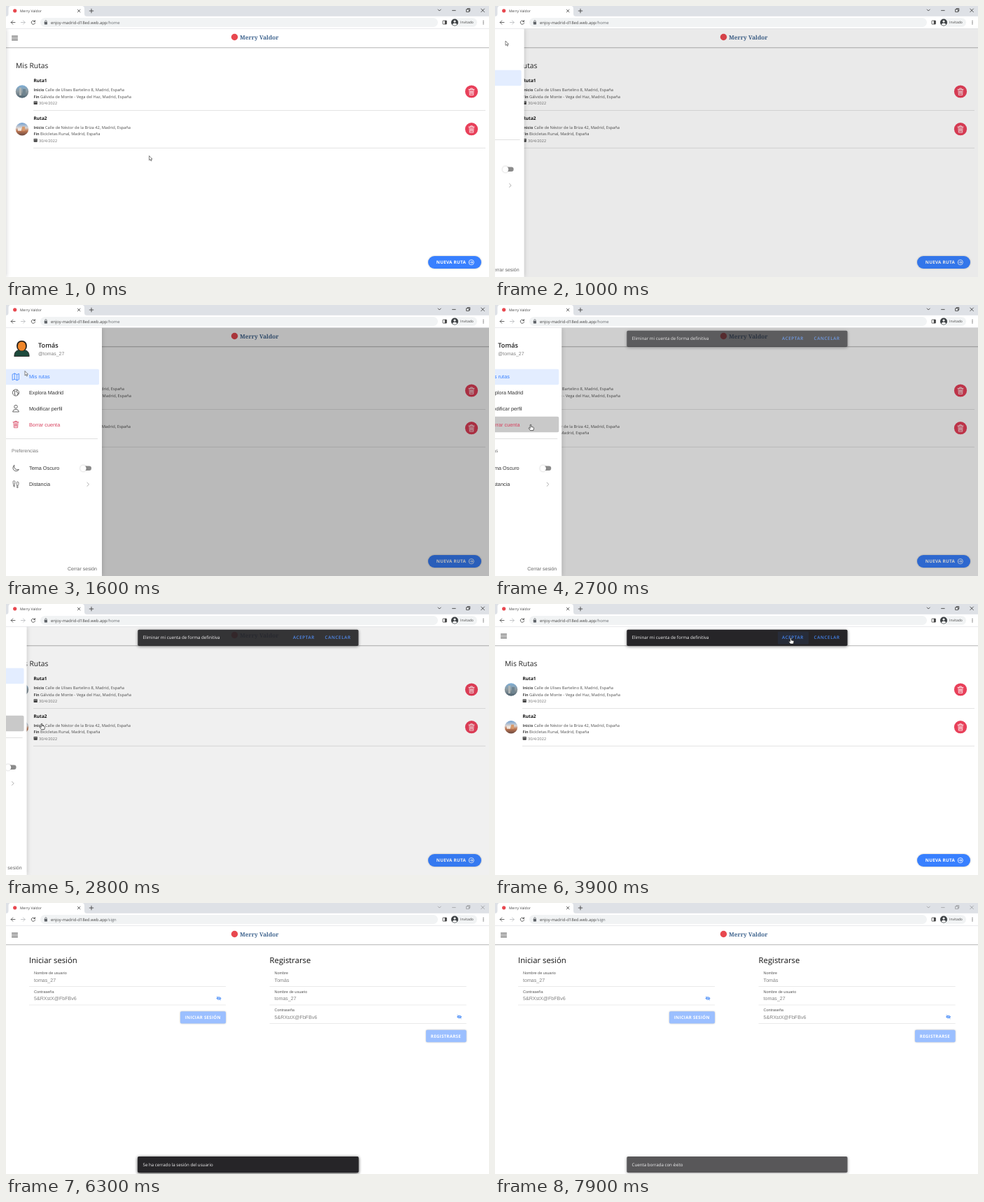
Recreate the animation shown at these times as an HTML page. Size 690 by 388 pixels, loop 8 s.

```html
<!DOCTYPE html>
<html lang="es">
<head>
<meta charset="utf-8">
<title>Merry Valdor</title>
<style>
html, body { margin: 0; width: 100%; height: 100%; overflow: hidden; background: #fff; }
svg { display: block; width: 100vw; height: 100vh; }
text { font-family: "Open Sans", "Noto Sans", sans-serif; white-space: pre; text-rendering: geometricPrecision; }
.ui { font-family: "Liberation Sans", Arial, sans-serif; }
.brand { font-family: "Noto Serif", serif; font-weight: 600; }
.b { font-weight: 700; }
.sb { font-weight: 600; }
.btn { font-weight: 700; letter-spacing: .25px; }
.act { font-weight: 600; letter-spacing: .6px; }
.ln { fill: none; stroke-width: .8; stroke-linecap: round; stroke-linejoin: round; }
.soft { filter: drop-shadow(0 .8px 1px #0004); }
.deep { filter: drop-shadow(0 1px 2px #0007); }
#menu { filter: drop-shadow(0 0 3px #0003); }
</style>
</head>
<body>
<svg id="stage" viewBox="0 0 690 388">
  <defs>
    <linearGradient id="thumb0" x2="0" y2="1">
      <stop offset="0" stop-color="#7fb0d8"/><stop offset=".5" stop-color="#8d999f"/><stop offset="1" stop-color="#4c6270"/>
    </linearGradient>
    <linearGradient id="thumb1" x2="0" y2="1">
      <stop offset="0" stop-color="#6f9fd2"/><stop offset=".4" stop-color="#d9d4d2"/><stop offset=".65" stop-color="#bd7550"/><stop offset="1" stop-color="#6b4a42"/>
    </linearGradient>
    <path id="bin" class="ln" d="M-3.9-3.3H3.9M-1.3-3.3V-4.7H1.3V-3.3M-3.1-3.3-2.6 4.7H2.6L3.1-3.3M-1.2-1.4V2.8M0-1.4V2.8M1.2-1.4V2.8"/>
    <g id="eye">
      <path d="M-3.6 0Q0-4.6 3.6 0Q0 4.6-3.6 0Z" fill="#5b98f8"/>
      <circle r="1.3" fill="#fff"/><circle r=".7" fill="#3880ff"/>
      <path d="M-2.7-2.5 2.7 2.5" class="ln" stroke="#5b98f8"/>
    </g>
  </defs>
  <rect width="690" height="388" fill="#fff"/>
  <g id="home"></g>
  <g id="sign"></g>
  <rect id="shade" y="32" width="690" height="356"/>
  <g id="menu"></g>
  <g id="chrome"></g>
  <g id="toasts"></g>
  <path id="arrow" d="M0 0V6.4L1.5 5 2.6 7.4 3.6 6.9 2.6 4.7H4.5Z" fill="#fff" stroke="#333" stroke-width=".6"/>
  <path id="hand" d="M-.8.6Q0-.6.8.6V3.4L3.8 4.1Q4.7 4.4 4.5 5.5L3.8 8.6H-.6L-2.8 5.4Q-2.6 4.3-1.5 4.9L-.8 5.6Z" fill="#fff" stroke="#222" stroke-width=".7"/>
</svg>
<script>
const $ = id => document.getElementById(id);
const text = (x, y, size, s, fill = '#333', cls = '') =>
  `<text x="${x}" y="${y}" font-size="${size}" fill="${fill}" class="${cls}">${s}</text>`;
const rect = (x, y, w, h, fill, r = 0, extra = '') =>
  `<rect x="${x}" y="${y}" width="${w}" height="${h}" rx="${r}" fill="${fill}" ${extra}/>`;
const disc = (x, y, r, fill, extra = '') => `<circle cx="${x}" cy="${y}" r="${r}" fill="${fill}" ${extra}/>`;
const line = (d, color, w = .8) => `<path class="ln" d="${d}" stroke="${color}" style="stroke-width:${w}"/>`;
const use = (id, x, y, color) => `<use href="#${id}" x="${x}" y="${y}" stroke="${color}"/>`;

const BLUE = '#3880ff', RED = '#e8405a';
const NAME = 'Merry Valdor', USER = 'tomas_27', PASS = '5&amp;RXstX@FbFBv6';

const header = rect(0, 32, 690, 356, '#fff') +
  rect(0, 59, 690, 1, '#c6c6c6') + rect(0, 60, 690, 1, '#ececec') +
  line('M8.5 43.2H16.5M8.5 45.9H16.5M8.5 48.6H16.5', '#333', 1) +
  disc(326.5, 44.5, 4.7, '#e8484f') + text(334, 48, 8.2, NAME, '#40658f', 'brand');

const route = (i, title, from, to) => `<g transform="translate(0 ${i * 53.7})">` +
  disc(23, 122.5, 9.2, `url(#thumb${i})`) +
  (i ? rect(17, 121, 5, 4, '#f0e6de') + rect(23, 119, 4, 6, '#d89a6c')
     : rect(19, 117, 3, 11, '#aeb4b3') + rect(24, 119, 4, 9, '#6f8490')) +
  text(39.5, 109, 6.5, title, '#111', 'b') +
  text(39.5, 122.4, 5.4, 'Inicio', '#444', 'b') + text(56, 122.4, 5.72, from, '#505050') +
  text(39.5, 131.5, 5.4, 'Fin', '#444', 'b') + text(49, 131.5, 5.72, to, '#505050') +
  rect(39.6, 136.2, 5.2, 4.8, '#444', .6) + rect(40.2, 137.6, 4, .5, '#fff') +
  text(47, 141.4, 5.5, '30/4/2022', '#707070') +
  rect(39, 149.2, 646, .7, '#d8d8d8') +
  disc(665, 122.5, 9.1, RED) + use('bin', 665, 122.7, '#fff') + '</g>';

$('home').innerHTML = header + text(14, 89, 10.3, 'Mis Rutas', '#222') +
  route(0, 'Ruta1', 'Calle de Ulises Bartelino 8, Madrid, España', 'Gálvida de Monte - Vega del Haz, Madrid, España') +
  route(1, 'Ruta2', 'Calle de Néstor de la Briza 42, Madrid, España', 'Bicicletas Runal, Madrid, España') +
  rect(603, 358, 76, 18, BLUE, 9, 'class="soft"') + text(614.8, 369.4, 6.3, 'NUEVA RUTA', '#fff', 'btn') +
  disc(664.8, 367, 3.6, 'none', 'stroke="#fff" stroke-width=".8"') +
  line('M663 367H666.6M665.2 365.5 666.7 367 665.2 368.5', '#fff');

const field = (x, row, label, value) => {
  const y = row * 26.5;
  return text(x + 7, y + 102.3, 5.5, label, '#555', 'ui') + text(x + 7, y + 112.6, 7.1, value, '#808080', 'ui') +
    rect(x, y + 119.2, 281, .6, '#dcdcdc') + (value === PASS ? use('eye', x + 271, y + 110, 'none') : '');
};
const submit = (x, y, w, label) => rect(x, y, w, 17.4, '#9bbfff', 1.8, 'class="soft"') +
  text(x + 6.8, y + 11.2, 6.2, label, '#fff', 'btn');

$('sign').innerHTML = header +
  text(33, 86, 11.3, 'Iniciar sesión', '#111') + text(376.6, 86, 11.3, 'Registrarse', '#111') +
  field(33, 0, 'Nombre de usuario', USER) + field(33, 1, 'Contraseña', PASS) +
  field(376.6, 0, 'Nombre', 'Tomás') + field(376.6, 1, 'Nombre de usuario', USER) + field(376.6, 2, 'Contraseña', PASS) +
  submit(249, 155.2, 65, 'INICIAR SESIÓN') + submit(600, 181.8, 57.6, 'REGISTRARSE');

const entry = (y, label, color = '#333') => text(33, y + 2.6, 7.3, label, color, 'ui');
const dark = '#444';
$('menu').innerHTML = rect(0, 32, 137, 356, '#fff') +
  '<path d="M11.8 73.5Q11.8 65.5 18 64.5H27Q33.2 65.5 33.2 73.5Z" fill="#1d4a3c" stroke="#211d1b" stroke-width=".8"/>' +
  rect(15.2, 51, 14.6, 15, '#211d1b', 6.6) + '<ellipse cx="22.5" cy="59" rx="5.7" ry="6.6" fill="#f0862a"/>' +
  text(46, 61.3, 9.2, 'Tomás', '#222', 'sb') + text(46, 72.4, 6.9, '@' + USER, '#808080', 'ui') +
  rect(-4, 91.8, 137, 22.4, '#e3edff', 2) +
  rect(-4, 159.8, 137, 22.4, '#000', 2, 'id="press"') +
  line('M9.5 99.2 12.3 98 15.7 99.6 18.5 98.3V106.6L15.7 107.8 12.3 106.2 9.5 107.4ZM12.3 98V106.2M15.7 99.6V107.8', BLUE) +
  entry(102.8, 'Mis rutas', BLUE) +
  disc(14, 125.5, 4.6, 'none', `stroke="${dark}" stroke-width=".8"`) +
  line('M10.4 122.6 13.2 123.4 12.2 126 13 129M16 121.6 15 124.4 17.6 126 16.2 128.6', dark, .9) +
  entry(125.5, 'Explora Madrid') +
  disc(14, 145.6, 2.3, 'none', `stroke="${dark}" stroke-width=".8"`) +
  line('M9.6 152.6Q10 149.3 14 149.3T18.4 152.6Z', dark) + entry(148.1, 'Modificar perfil') +
  use('bin', 14, 171, '#d8425f') + entry(170.9, 'Borrar cuenta', '#d8425f') +
  rect(0, 191.3, 131, .7, '#d4d4d4') + text(8, 211, 6.8, 'Preferencias', '#777', 'ui') +
  line('M11.6 229.6A4.6 4.6 0 1 0 18.4 235.6Q11.2 237 11.6 229.6Z', dark) + entry(233.7, 'Tema Oscuro') +
  rect(108, 230.6, 14, 6.4, '#8b8b8b', 3.2) + disc(110.4, 233.9, 4.3, '#fff', 'class="soft"') +
  line('M10.2 255Q9.2 251.6 11.4 251.6T12.8 255L12.4 257H10.8ZM10.9 258.4H12.4Q12.4 260.4 11.6 260.4T10.9 258.4M15.4 257Q14.6 253 16.6 253T18 256.6L17.3 258.6H15.7ZM15.8 260H17.2Q17.1 262 16.3 262T15.8 260', dark, .7) +
  entry(256.5, 'Distancia') + line('M115.9 254.2 118.5 256.8 115.9 259.4', '#999') +
  text(88, 379.5, 7, 'Cerrar sesión', '#666', 'ui');

const gray = '#5f6368';
$('chrome').innerHTML = rect(0, 0, 690, 15, '#dee1e6') +
  '<path d="M0 15Q3.5 15 3.5 11V4Q3.5 0 7 0H108.5Q112 0 112 4V11Q112 15 115.5 15Z" fill="#fff"/>' +
  rect(0, 14.8, 690, 17.4, '#fff') + rect(0, 32, 690, .6, '#dadce0') +
  disc(12.7, 6.8, 2.6, '#e8484f') + text(20, 8.9, 5.1, NAME, '#444') +
  line('M102.4 5.2 106 8.8M106 5.2 102.4 8.8', '#333') + line('M119.2 7H124.8M122 4.2V9.8', '#333') +
  '<g id="frame">' + line('M617.2 5 619.2 7 621.2 5M637.6 6.4H642.2M658 4.8H661.6V8.4H658ZM659.2 4.6V3.6H662.8V7.2H661.8M678.8 4 683.4 8.6M683.4 4 678.8 8.6', '#333') + '</g>' +
  line('M13 23.5H7.2M9.8 20.9 7.2 23.5 9.8 26.1', '#444') +
  line('M21.4 23.5H27.2M24.6 20.9 27.2 23.5 24.6 26.1', '#b5b8bb') +
  line('M41 21.8A2.7 2.7 0 1 0 41.6 24.2M41.5 20.6V22.5H39.6', '#444') +
  rect(49, 17, 568, 13, '#f1f3f4', 6.5) +
  rect(54.8, 22.8, 4.2, 3.6, gray, .4) + line('M55.7 22.8V21.6Q55.7 20.6 56.9 20.6T58.1 21.6V22.8', gray, .7) +
  `<text x="64" y="25.8" font-size="5.86" fill="#444">enjoy-madrid-d18ed.web.app<tspan id="path" fill="#666a6e">/home</tspan></text>` +
  rect(624, 21, 5.4, 5, 'none', .4, 'stroke="#444" stroke-width=".8"') + rect(626.8, 21, 2.6, 5, '#444') +
  rect(635, 17.2, 38, 12.6, '#f1f3f4', 6.3) + disc(641, 23.5, 5, '#3c4043') +
  disc(641, 22, 1.6, '#fff') + '<path d="M637.8 26.4Q638.4 24.4 641 24.4T644.2 26.4Q641 29 637.8 26.4Z" fill="#fff"/>' +
  text(649, 25.4, 5, 'Invitado', '#444') + [-2.2, 0, 2.2].map(d => disc(682, 23.5 + d, .65, '#444')).join('');

const toast = (id, y, s, extra = '') => `<g id="${id}">` + rect(188.3, y, 315.2, 23.2, '#262528', 1.8, 'class="deep"') +
  text(195.5, y + 13.6, 6.2, s, '#f2f2f2') + extra + '</g>';
$('toasts').innerHTML =
  toast('ask', 36.8, 'Eliminar mi cuenta de forma definitiva',
    rect(404, 39.5, 44, 18, '#3880ff14', 1, 'id="hover"') +
    text(410, 50.2, 6.3, 'ACEPTAR', '#4484ee', 'act') + text(455.6, 50.2, 6.3, 'CANCELAR', '#4484ee', 'act')) +
  toast('gone', 362.9, 'Cuenta borrada con éxito') +
  toast('closed', 362.9, 'Se ha cerrado la sesión del usuario');

const clamp = v => Math.min(1, Math.max(0, v));
const ramp = (t, start, dur) => clamp((t - start) / dur);
const smooth = v => v * v * (3 - 2 * v);

// Timing curve with control points (x1,y1) and (x2,y2), solved by bisection.
function bezier(x1, y1, x2, y2, v) {
  const at = (a, b, s) => 3 * a * s * (1 - s) ** 2 + 3 * b * s * s * (1 - s) + s ** 3;
  let lo = 0, hi = 1;
  for (let i = 0; i < 24; i++) {
    const mid = (lo + hi) / 2;
    if (at(x1, x2, mid) < v) lo = mid; else hi = mid;
  }
  return at(y1, y2, hi);
}

// Pointer stops: time, x, y.
const stops = [[0, 204.5, 214.5], [600, 15, 50], [1500, 15, 50], [1600, 27, 94.5],
  [2400, 51, 171], [3300, 51, 171], [3900, 422.5, 48.5], [8000, 422.5, 48.5]];
function pointer(t) {
  const i = stops.findIndex((s, k) => k && t < s[0]);
  const [a, b] = [stops[i - 1], stops[i]];
  const p = smooth(ramp(t, a[0], b[0] - a[0]));
  return [a[1] + (b[1] - a[1]) * p, a[2] + (b[2] - a[2]) * p];
}

const show = (id, on) => { $(id).style.display = on ? '' : 'none'; };
const fade = (id, v) => { show(id, v > 0); $(id).style.opacity = v; };
const within = (t, a, b) => t >= a && t < b;

function draw(t) {
  const open = t < 2000 ? bezier(0, 0, .2, 1, ramp(t, 970, 300)) : 1 - smooth(ramp(t, 2590, 300));
  show('menu', open > 0);
  $('menu').setAttribute('transform', `translate(${137 * (open - 1)} 0)`);
  fade('shade', .27 * open);
  fade('press', t < 2500 ? 0 : .1 + .11 * ramp(t, 2500, 200));

  const enter = bezier(.36, .66, .04, 1, ramp(t, 4440, 340));
  fade('sign', enter);
  $('sign').setAttribute('transform', `translate(0 ${40 * (1 - enter)})`);
  $('path').textContent = t < 4500 ? '/home' : '/sign';
  $('frame').style.opacity = t < 5800 ? 1 : .4;

  fade('ask', Math.min(ramp(t, 2430, 400), 1 - ramp(t, 4450, 300)));
  show('hover', within(t, 3900, 4800));
  fade('closed', Math.min(ramp(t, 4400, 400), 1 - ramp(t, 6800, 300)));
  fade('gone', t < 4800 ? 0 : 1 - ramp(t, 7830, 300));

  const hand = within(t, 600, 1000) || within(t, 1700, 3400) || within(t, 3900, 4600);
  const [x, y] = pointer(t);
  show('hand', hand);
  show('arrow', !hand && t < 5700);
  for (const id of ['hand', 'arrow']) $(id).setAttribute('transform', `translate(${x} ${y})`);
}

const begin = performance.now();
function tick() {
  draw(Math.floor((performance.now() - begin) % 8000 / 100) * 100);
  requestAnimationFrame(tick);
}
tick();
</script>
</body>
</html>
```
